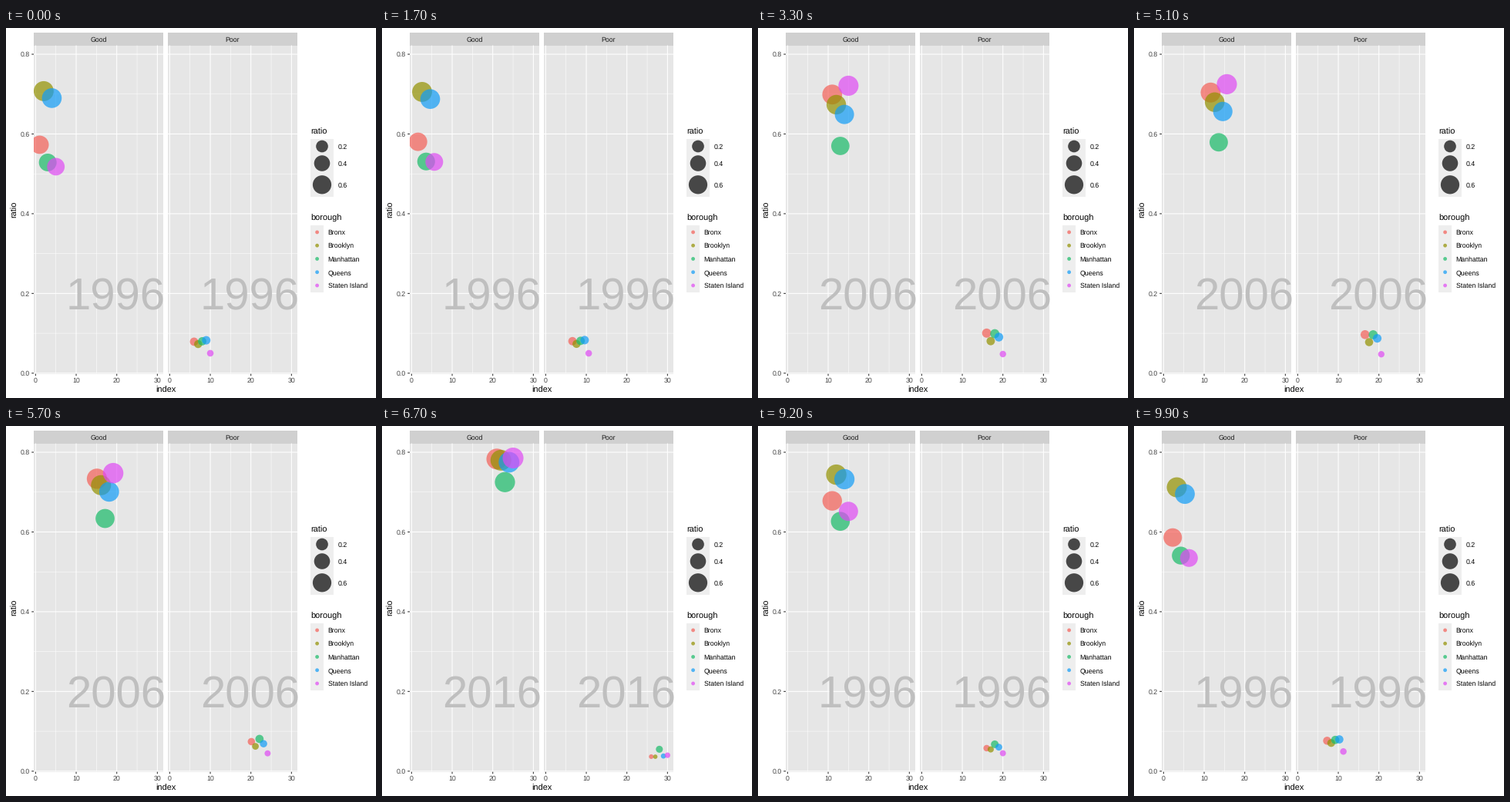
A matplotlib script that plays this animation: 480x480 px, repeating every 10 s.

```python
import matplotlib.pyplot as plt
from matplotlib.animation import FuncAnimation
from matplotlib.patches import Circle, Rectangle
from math import sqrt

plt.rcParams["font.family"] = "Liberation Sans"
plt.rcParams["text.hinting"] = "no_hinting"

SIZE = 480
PT = 0.72  # points per pixel at 100 dpi
FRAMES = 100
HOLD_ENDS = (16, 50, 84)   # last resting frame of each state
STEPS = (17, 17, 16)       # frames each move takes

BOROUGHS = ("Bronx", "Brooklyn", "Manhattan", "Queens", "Staten Island")
COLORS = ("#F45F57", "#929100", "#17BB67", "#109CF7", "#E049F4")
ALPHA = 0.7
YEARS = ("1996", "2006", "2016")
GOOD = (
    (0.573, 0.7075, 0.5285, 0.690, 0.518),
    (0.699, 0.6735, 0.570, 0.649, 0.721),
    (0.783, 0.780, 0.725, 0.775, 0.7855),
)
POOR = (
    (0.079, 0.073, 0.080, 0.0825, 0.050),
    (0.1005, 0.0805, 0.099, 0.0905, 0.048),
    (0.0365, 0.0363, 0.055, 0.038, 0.040),
)
LOW, HIGH = 0.0363, 0.7855

PANEL_W, TOP, BOTTOM = 168, 22.5, 448.5
PANELS = ((36, "Good", GOOD), (210, "Poor", POOR))

fig = plt.figure(figsize=(4.8, 4.8), dpi=100, facecolor="white")
ax = fig.add_axes((0, 0, 1, 1))
ax.set_xlim(0, SIZE)
ax.set_ylim(SIZE, 0)
ax.axis("off")


def px(left, x):
    return left + (x + 0.45) * PANEL_W / 31.9


def py(ratio):
    return 447.8 - 517.2 * ratio


def radius(ratio):
    """Dot radius in pixels, with area following the ratio."""
    share = max(0, (ratio - LOW) / (HIGH - LOW))
    return 1.067 * (2 + 10 * sqrt(share)) + 0.71


def box(x, y, w, h, color):
    return ax.add_patch(Rectangle((x, y), w, h, fc=color, lw=0, zorder=0))


def line(x0, y0, x1, y1, width, color="white"):
    ax.plot((x0, x1), (y0, y1), color=color, lw=width * PT, snap=False,
            solid_capstyle="butt", zorder=1)


def label(x, y, text, size=8.8, color="black", ha="left", **kw):
    """Text centred on y by its capital height."""
    return ax.text(x, y + 0.358 * size, text, fontsize=size * PT, color=color,
                   ha=ha, va="baseline", **kw)


def dot(x, y, r, color, zorder=4):
    return ax.add_patch(Circle((x, y), r, fc=color, lw=0, alpha=ALPHA,
                               zorder=zorder))


def draw_panel(left, title):
    right = left + PANEL_W
    panel = box(left, TOP, PANEL_W, BOTTOM - TOP, "#E6E6E6")
    box(left, 5.5, PANEL_W, TOP - 5.5, "#D0D0D0")
    label(left + PANEL_W / 2, 14.5, title, color="#1A1A1A", ha="center")
    for x in (5, 15, 25):
        line(px(left, x), TOP, px(left, x), BOTTOM, 0.53)
    for tenth in (1, 3, 5, 7):
        line(left, py(tenth / 10), right, py(tenth / 10), 0.53)
    for x in (0, 10, 20, 30):
        xx = px(left, x)
        line(xx, TOP, xx, BOTTOM, 1.07)
        line(xx, BOTTOM, xx, BOTTOM + 2.75, 1.07, "#333333")
        label(xx, 457.2, str(x), color="#444444", ha="center")
    for tenth in (0, 2, 4, 6, 8):
        line(left, py(tenth / 10), right, py(tenth / 10), 1.07)
    return panel


def draw_axis():
    for tenth in (0, 2, 4, 6, 8):
        y = py(tenth / 10)
        line(33.25, y, 36, y, 1.07, "#333333")
        label(31, y, f"{tenth / 10:.1f}", color="#444444", ha="right")
    label(207, 469.2, "index", 11, ha="center")
    ax.text(14, 235.5, "ratio", fontsize=11 * PT, rotation=90, ha="center",
            va="baseline", rotation_mode="anchor")


def draw_legends():
    label(395, 134.2, "ratio", 11)
    box(395, 144, 30, 75, "#EEEEEE")
    for ratio, y in ((0.2, 153.5), (0.4, 175.5), (0.6, 203.3)):
        dot(410, y, radius(ratio), "black")
        label(430.8, y, str(ratio))
    label(395, 246.2, "borough", 11)
    box(395, 256.2, 17.3, 86.4, "#EEEEEE")
    for i, (name, color) in enumerate(zip(BOROUGHS, COLORS)):
        y = 264.9 + 17.28 * i
        dot(403.6, y, 2.4, color)
        label(417.5, y, name)


draw_axis()
draw_legends()
years, dots = [], []
for left, title, _ in PANELS:
    panel = draw_panel(left, title)
    year = label(left + 106.3, py(0.2), YEARS[0], 58, "#BFBFBF", "center",
                 zorder=3)
    year.set_clip_path(panel)
    years.append(year)
    row = [dot(0, 0, 1, color, 5 + i) for i, color in enumerate(COLORS)]
    for d in row:
        d.set_clip_path(panel)
    dots.append(row)


def phase(frame):
    """Current state, next state and the share of the move done."""
    state = 0
    while state < 2 and frame >= HOLD_ENDS[state] + STEPS[state]:
        state += 1
    done = max(0, frame - HOLD_ENDS[state]) / STEPS[state]
    return state, (state + 1) % 3, done


def update(frame):
    a, b, t = phase(frame)

    def mix(u, v):
        return u + (v - u) * t

    for p, (left, _, data) in enumerate(PANELS):
        years[p].set_text(YEARS[a if t < 0.5 else b])
        for i, d in enumerate(dots[p]):
            start, end = data[a][i], data[b][i]
            x = mix(10 * a, 10 * b) + 5 * p + i + 1
            d.center = px(left, x), py(mix(start, end))
            d.radius = mix(radius(start), radius(end))
    return []


anim = FuncAnimation(fig, update, frames=FRAMES, interval=100, repeat=True,
                     repeat_delay=0, blit=False)
plt.show()
```
